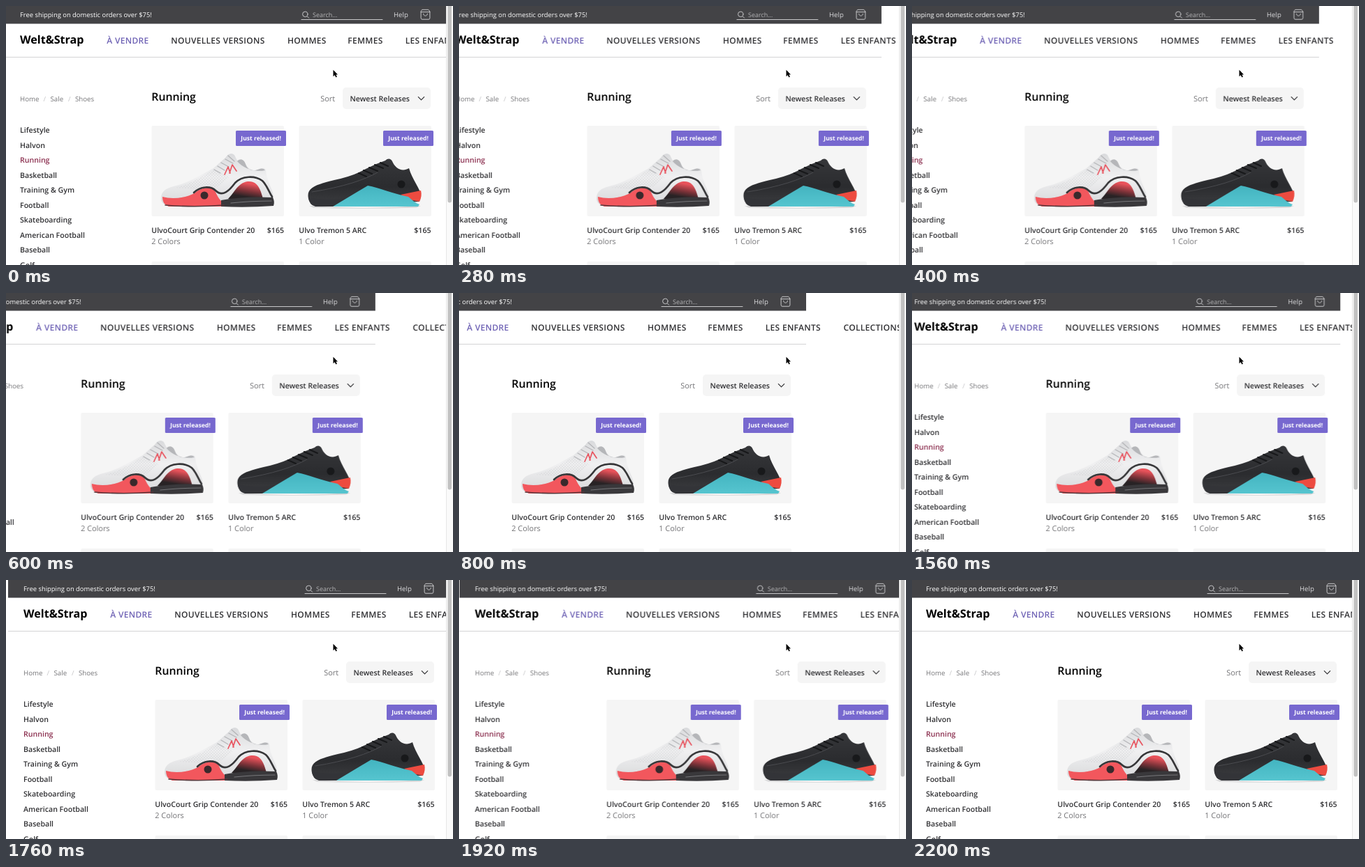
Recreate the animation shown at these times as an HTML page. Size 640 by 372 pixels, loop 2.24 s.

```html
<!DOCTYPE html>
<html lang="en">
<head>
<meta charset="utf-8">
<title>Shoe store</title>
<style>
  html, body { margin: 0; width: 100%; height: 100%; overflow: hidden; background: #fff; }
  svg { display: block; width: 640px; height: 372px; }
  text {
    font: 600 10.6px "Open Sans", "Noto Sans", sans-serif;
    fill: #303033;
    text-rendering: geometricPrecision;
  }
  .bar text { font-size: 9.4px; font-weight: 500; fill: #fff; }
  .bar .dim { font-size: 9px; fill: #b4b4b6; }
  .bar .help { font-size: 9.6px; fill: #dcdcde; }
  .nav text { font-size: 12px; letter-spacing: .3px; }
  .nav .sale { fill: #6f63b5; }
  .nav .logo { font-size: 16.1px; font-weight: 700; letter-spacing: 0; fill: #000; }
  .crumbs text { font-size: 9.7px; font-weight: 500; fill: #77777a; }
  .crumbs .slash { fill: #c4c4c6; }
  .current { fill: #8b2f4f; }
  .title { font-size: 15.8px; fill: #000; }
  .grey { font-size: 10.9px; font-weight: 500; fill: #727275; }
  .price { text-anchor: end; }
  .tag { font-size: 8.6px; font-weight: 700; fill: #fff; }
  .line { fill: none; stroke-linecap: round; stroke-linejoin: round; }

  #page { animation: scroll 2240ms linear infinite; }
  @keyframes scroll {
    0%, 1% { transform: translateX(0); }
    4.46% { transform: translateX(-3px); }
    8.93% { transform: translateX(-13px); }
    13.39% { transform: translateX(-28px); }
    17.86% { transform: translateX(-47px); }
    22.32% { transform: translateX(-72px); }
    26.79% { transform: translateX(-101px); }
    31.25% { transform: translateX(-122px); }
    35.71% { transform: translateX(-133px); }
    41.07% { transform: translateX(-137px); }
    48.21%, 50% { transform: translateX(-138px); }
    55.36% { transform: translateX(-137px); }
    58.93% { transform: translateX(-117px); }
    62.5% { transform: translateX(-80px); }
    66.07% { transform: translateX(-43px); }
    69.64% { transform: translateX(-17px); }
    73.21% { transform: translateX(-2px); }
    75.89% { transform: translateX(4px); }
    78.57% { transform: translateX(5px); }
    84.82% { transform: translateX(3px); }
    91.07% { transform: translateX(1px); }
    98.21%, 100% { transform: translateX(0); }
  }
</style>
</head>
<body>
<svg viewBox="0 0 640 372">
  <defs>
    <linearGradient id="mesh" x1="0" y1="0" x2="0" y2="1">
      <stop offset="0" stop-color="#d9dadc"/>
      <stop offset=".45" stop-color="#f0f0f1"/>
      <stop offset="1" stop-color="#d8d9db"/>
    </linearGradient>
    <linearGradient id="fade" x1=".7" y1="0" x2=".35" y2="1">
      <stop offset=".15" stop-color="#e8525a"/>
      <stop offset=".55" stop-color="#7a3238"/>
      <stop offset=".85" stop-color="#282325"/>
    </linearGradient>
    <linearGradient id="black" x1="0" y1="0" x2="0" y2="1">
      <stop offset="0" stop-color="#36373a"/>
      <stop offset=".6" stop-color="#2b2c2f"/>
      <stop offset="1" stop-color="#3b3c3f"/>
    </linearGradient>
    <linearGradient id="teal" x1="0" y1="0" x2="0" y2="1">
      <stop offset="0" stop-color="#43b4c0"/>
      <stop offset="1" stop-color="#56c5cf"/>
    </linearGradient>
    <pattern id="dots" width="4" height="4" patternUnits="userSpaceOnUse">
      <circle cx="1" cy="1" r=".55" fill="#bcbdc0"/>
      <circle cx="3" cy="3" r=".55" fill="#bcbdc0"/>
    </pattern>
    <g id="card">
      <rect x="208.5" y="172" width="189.5" height="130" rx="2" fill="#f5f5f5"/>
      <rect x="208.5" y="367" width="189.5" height="20" rx="2" fill="#f5f5f5"/>
    </g>
    <g id="badge">
      <rect x="329" y="179" width="72" height="22" rx="1.5" fill="#7768cf"/>
      <text class="tag" x="336.3" y="193.3">Just released!</text>
    </g>
    <clipPath id="view"><path d="M0 0H630.5V372H0z"/></clipPath>
  </defs>

  <g clip-path="url(#view)">
  <g id="page">
    <g class="bar">
      <rect x="-2" width="632" height="25.5" fill="#434346"/>
      <text x="20" y="16">Free shipping on domestic orders over $75!</text>
      <g class="line" stroke="#c8c8ca">
        <circle cx="428.3" cy="11.8" r="3.7"/>
        <path d="M431 14.6l2.6 2.6M423 19.5H539"/>
        <path d="M596.2 5.3H604.8L606.9 8V17.3Q606.9 19.2 605 19.2H596Q594.1 19.2 594.1 17.3V8zM594.1 8.6H606.9M597.6 11.2C597.8 15.2 603.2 15.2 603.4 11.2"/>
      </g>
      <text class="dim" x="439" y="16">Search…</text>
      <text class="help" x="555" y="16">Help</text>
    </g>

    <g class="nav">
      <path d="M-2 73.5H630" stroke="#d3d3d5"/>
      <text class="logo" x="20" y="54.2">Welt&amp;Strap</text>
      <text class="sale" x="144.3" y="54.4">À VENDRE</text>
      <text x="236.3" y="54.4">NOUVELLES VERSIONS</text>
      <text x="403" y="54.4">HOMMES</text>
      <text x="489.3" y="54.4">FEMMES</text>
      <text x="571.8" y="54.4">LES ENFANTS</text>
      <text x="683.5" y="54.4">COLLECTIONS</text>
    </g>

    <g class="crumbs">
      <text x="20" y="136.5">Home</text>
      <text class="slash" x="53.5" y="136.5">/</text>
      <text x="63.5" y="136.5">Sale</text>
      <text class="slash" x="89" y="136.5">/</text>
      <text x="99" y="136.5">Shoes</text>
    </g>

    <text x="20" y="182">Lifestyle</text>
    <text x="20" y="203.5">Halvon</text>
    <text x="20" y="225" class="current">Running</text>
    <text x="20" y="246.5">Basketball</text>
    <text x="20" y="268">Training &amp; Gym</text>
    <text x="20" y="289.5">Football</text>
    <text x="20" y="311">Skateboarding</text>
    <text x="20" y="332.5">American Football</text>
    <text x="20" y="354">Baseball</text>
    <text x="20" y="375.5">Golf</text>

    <text class="title" x="208.3" y="136.3">Running</text>
    <text class="grey" x="450.3" y="136.8">Sort</text>
    <rect x="482" y="117" width="126" height="31" rx="5" fill="#f5f5f5"/>
    <text x="492.5" y="136.6">Newest Releases</text>
    <path class="line" d="M590.3 130.7l4.2 4.2 4.2-4.2" stroke="#303033" stroke-width="1.2"/>

    <use href="#card"/>
    <use href="#card" x="211"/>

    <!-- light court shoe -->
    <g>
      <path d="M222 276C222 267 228 262 240 259C262 254 280 242 297 233L314 218C318 212 323 210 327 214L331 222C336 218 341 221 343 227C347 235 356 238 362 235C367 232 371 232 372 236C373 248 378 257 382 268L384 284L232 287C225 285 222 281 222 276z" fill="url(#mesh)"/>
      <path d="M242 261C264 256 282 244 298 235L320 246L302 260L272 263z" fill="url(#dots)"/>
      <path d="M331 223C341 234 356 239 371 236C367 231 362 235 357 236C349 237 345 233 343 227C341 221 336 218 331 223z" fill="#b5b6b9"/>
      <path class="line" d="M298 235l9 5M303 230l10 6M308 225l11 6M314 220l11 6M318 215l9 8" stroke="#b5b6b9" stroke-width="1.4"/>
      <path class="line" d="M313 242l5-11 3 9M320 240l4-12 6 9" stroke="#e85560" stroke-width="1.7"/>
      <path d="M224 274C238 278 258 276 271 268C280 260 293 259 299 265C303 274 307 282 316 285L314 288H233C227 286 224 281 224 274z" fill="#f2575d"/>
      <path d="M318 277C327 268 332 254 346 252C360 251 364 262 368 277z" fill="url(#fade)"/>
      <path d="M308 279Q340 273 382 275Q385 281 383 287Q345 290 308 288z" fill="#39383b"/>
      <path class="line" d="M322 283Q350 280 380 280" stroke="#77777a" stroke-width="1.2"/>
      <path class="line" d="M269 268C278 259 293 258 300 265C310 275 320 265 328 254C338 244 356 243 367 251C374 258 376 266 381 274" stroke="#363638" stroke-width="2.6"/>
      <path class="line" d="M228 286Q270 289.5 312 286" stroke="#57373b" stroke-width="1.6"/>
      <circle cx="284" cy="272" r="5.5" fill="#3a292c"/>
    </g>

    <!-- dark training shoe -->
    <g>
      <path d="M434 287Q515 293 594 287L588 289.5Q510 292 440 289.5z" fill="#d4d4d5"/>
      <path d="M432.5 272C432.500 260 446 256 470 250Q498 244 515 234L530 227L543 222C547 218 551 219 553 223C557 233 567 239 577 233C580 244 588 256 593 267L592 281L480 286L438 284C434 281 432.5 277 432.5 272z" fill="url(#black)"/>
      <path class="line" d="M505 240l11 5M512 236l12 5M520 232l12 5M528 228l12 5M536 225l11 5" stroke="#17181a" stroke-width="2"/>
      <path class="line" d="M438 267Q470 262 496 254Q518 247 532 239" stroke="#4b4c50"/>
      <path d="M565 271L594 265Q596 273 592 281L577 278z" fill="#ed4b40"/>
      <path d="M433 275Q458 280 488 276L472 288H443Q434 286 433 275z" fill="#333438"/>
      <path d="M468 288L518 258C534 261 552 269 576 274C582 279 586 283 592 285L590 288z" fill="url(#teal)"/>
      <circle cx="566" cy="256" r="5.5" fill="#18191b"/>
    </g>

    <use href="#badge"/>
    <use href="#badge" x="211"/>

    <text x="208.3" y="326">UlvoCourt Grip Contender 20</text>
    <text class="price" x="398" y="326">$165</text>
    <text class="grey" x="208.3" y="341.5">2 Colors</text>
    <text x="419.3" y="326">Ulvo Tremon 5 ARC</text>
    <text class="price" x="608.5" y="326">$165</text>
    <text class="grey" x="419.3" y="341.5">1 Color</text>
  </g>
  </g>

  <rect x="630" width="10" height="372" fill="#fafafa"/>
  <path d="M630.5 0V372" stroke="#e6e6e6"/>
  <rect x="632.5" y="-4" width="5.5" height="286.5" rx="2.75" fill="#c1c1c1"/>
  <path d="M468.5 91.8V101.2L470.7 99.2L472.3 102.5L473.9 101.7L472.4 98.6H475z" fill="#000" stroke="#fff" stroke-width=".8" paint-order="stroke"/>
</svg>
</body>
</html>
```
